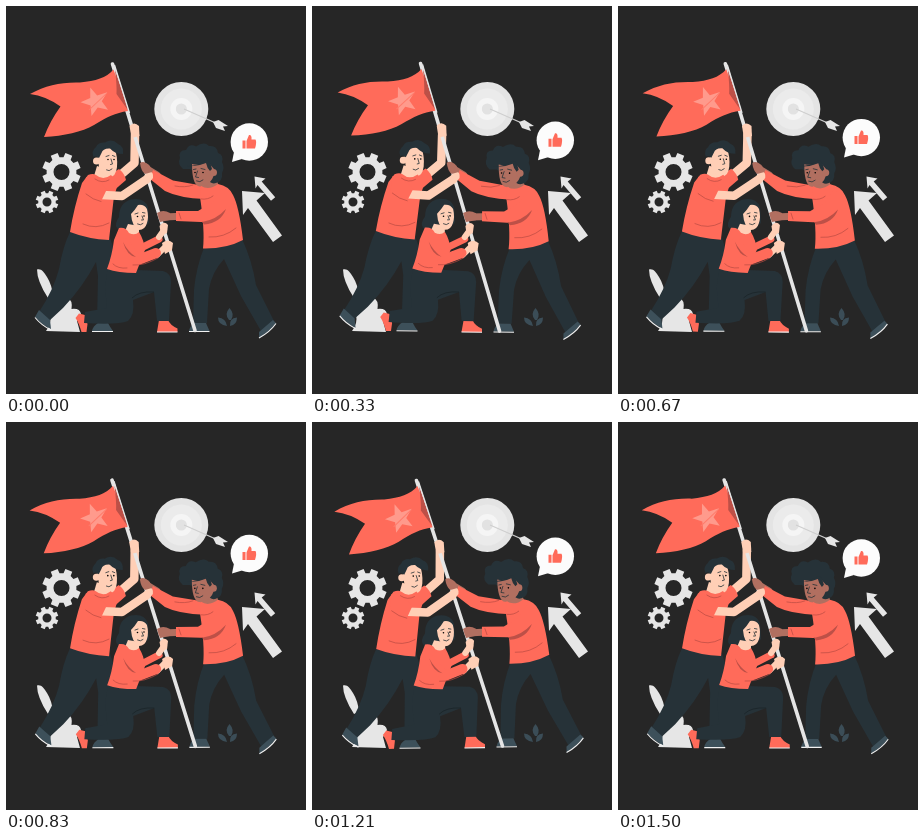
Animation of 300x388 px, one loop 1540 ms. Source, as an HTML page:

```html
<!DOCTYPE html>
<html lang="en">
<head>
<meta charset="utf-8">
<title>Raising the flag</title>
<style>
  html, body { margin: 0; width: 100%; height: 100%; overflow: hidden; background: #262626; }
  svg { display: block; width: 100vw; height: 100vh; }
  .coral { fill: #ff6b5a; }
  .pale { fill: #ffcfb6; }
  .brown { fill: #b16f60; }
  .navy, .hair { fill: #263238; }
  .light { fill: #e6e6e6; }
  .white { fill: #fcfcfc; }
  .shoe { fill: #3d505a; }
  .leaf { fill: #3b4d57; }
  .limb { fill: none; stroke-linecap: round; stroke-linejoin: round; }
  .limb.coral { stroke: #ff6b5a; }
  .limb.pale { stroke: #ffcfb6; }
  .limb.brown { stroke: #b16f60; }
  .fold { fill: none; stroke: #b94b42; stroke-width: .7; stroke-linecap: round; }
  .sole { fill: none; stroke: #f2f2f2; stroke-width: 1.1; }
  .shade { fill: #bd5047; }
  .line { fill: none; stroke: #263238; stroke-width: .8; stroke-linecap: round; }
</style>
</head>
<body>
<svg viewBox="0 0 300 388" preserveAspectRatio="none">
  <!-- scenery -->
  <g class="light">
    <path id="bigGear" fill-rule="evenodd"/>
    <path id="smallGear" fill-rule="evenodd"/>
    <path d="M236 185 259 187 250.500 194.500 276 229.500 267 236 242 202 237 209Z"/>
    <path d="M248.500 170.500 259.500 172.500 255.700 175.500 269.200 191.300 265 194.700 251.500 179 249.500 182.500Z"/>
    <path d="M31 263.500C35 262 38 266 41 271Q46 279 47 290L42 292Q31 275 31 263.500Z"/>
    <path d="M40 325Q46 317 44 309Q46 302 52 300Q54 291 61 291.500Q67 294 65.500 303Q74 302 75 308Q74 312 71 315L74 326Z"/>
  </g>
  <circle cx="175.300" cy="103" r="27" fill="#e4e4e4"/>
  <circle cx="175.300" cy="103" r="20.500" fill="#ebebeb"/>
  <circle cx="175.300" cy="103" r="11" fill="#f5f5f5"/>
  <circle cx="175.300" cy="103" r="5.500" fill="#e2e2e2"/>
  <path d="M178 103 212 118" stroke="#cfcfcf" stroke-width="1.200"/>
  <path d="M207 116 212.500 114 222 120 217 120.500 219 125 210 122Z" class="light"/>
  <path class="leaf" d="M223 314Q218 308 223.500 302Q229 308 225 314ZM221 320Q212 319 212 311.500Q220 312 221 320ZM224 320Q223 312 231 311.500Q231 319 224 320Z"/>

  <g id="bubble">
    <circle class="white" cx="243.300" cy="136" r="18.700"/>
    <path class="white" d="M226 156 228 146 236 153Z"/>
    <path class="coral" d="M236.500 134.500h3v8h-3zM240.500 135 243 129Q246 128.500 245.500 133.500H249.500Q251 136 249 142.500H240.500Z"/>
  </g>

  <g id="team">
    <!-- left man, legs -->
    <path class="navy" d="M64 226 104 232Q111 250 111 270L105 317H91L92 270 90 256Q77 281 57 302L43 315 33 306Q48 283 53 263Q57 240 64 226Z"/>
    <path class="shoe" d="M33 304 44 314 45 323Q36 319 29 311Z"/>
    <path class="sole" d="M29 311.500Q35 319 45 324"/>
    <path class="shoe" d="M92 317H102Q104 321 107 325H86Q87 320 92 317Z"/>
    <path class="sole" d="M86 325.500h21"/>

    <!-- right man, legs -->
    <path class="navy" d="M199 239 236 233Q246 254 250 279L268 315 255 325 235 290 218 253Q206 266 203 283L201 317H187L188 284Q190 261 199 239Z"/>
    <path class="shoe" d="M267 314 270 317Q264 325 253 332L253 326 260 320Z"/>
    <path class="sole" d="M270 317.500Q264 326 253 332"/>
    <path class="shoe" d="M188 317H200L203.500 325H183Q184 320 188 317Z"/>
    <path class="sole" d="M183 325.500h20.500"/>

    <!-- left man, raised arm -->
    <path class="limb pale" stroke-width="8.500" d="M111 172 128.500 157 129 129"/>
    <path class="coral" d="M99 172 113 163Q119 168 120 174L105 187Z"/>

    <!-- right man, far arm -->
    <path class="limb brown" stroke-width="7" d="M151 169 141 163"/>
    <path class="coral" d="M147 164 167 174.500 190 178.500 205 179 199 193Q173 192 159 185L144 173Z"/>

    <!-- pole and flag -->
    <path d="M106.500 58 189 324.500" stroke="#e5e5e5" stroke-width="3.600" stroke-linecap="round"/>
    <path class="coral" d="M107.500 63.500C100 72 90 75 74 76.500C55 76 40 79 24 88Q40 90 54.500 100.500Q44 115 38 131C58 130 76 126 88 119C101 111 109 107 122 105Z"/>
    <path class="shade" d="M109 63.500Q111 80 110.500 88L122.500 105Z"/>
    <path d="M108.500 59 123.500 107" stroke="#e5e5e5" stroke-width="1.300"/>
    <path id="star" fill="#ff9a8c"/>
    <path d="M83 104 101 87" stroke="#ff7b6b"/>

    <!-- left man -->
    <path class="pale" d="M91 160 104 164 105 171Q96 176 88 170Z"/>
    <path class="pale" d="M91 144Q98 138 108 140Q112 151 111 161Q110 171 103 171Q96 170 93 161Z"/>
    <circle class="pale" cx="90.500" cy="155" r="3.500"/>
    <path class="hair" d="M87.500 151Q85 145 90 141Q92 136 99 136.500Q106 132 112 138Q118 140 117 148Q109 148 104 142.500Q97 142 95.500 147L93 152Q90 149 87.500 151Z"/>
    <path class="line" d="M100 150.500 103 149.500M106.500 149.500 109 150.500M105 153 106.500 158 104.500 158.500M100.500 164Q103 166 106 163"/>
    <circle cx="102" cy="153.500" r=".8"/><circle cx="108" cy="153.500" r=".8"/>
    <path class="coral" d="M82 169Q87 167 90 169Q97 175 105 169L112 177Q110 185 108 190L103 234Q82 233 64 226Q68 201 76 177Z"/>
    <path class="limb pale" stroke-width="8.500" d="M96 189 116 190 141 173"/>
    <path class="coral" d="M80 171Q88 171 101 183L95 195.500Q86 193 78 187Z"/>
    <path class="fold" d="M80 188Q87 194 95 195.500M77 218Q90 224 103 217M89 173Q96 178 103 174"/>

    <!-- woman -->
    <path class="coral" d="M73 307.500 79 309 81.500 318 80.500 326H75.500Q73 317 69.500 312Z"/>
    <path class="coral" d="M153 314H162Q164 319 171.500 322.500V326H151Z"/>
    <path class="sole" d="M151 326h20.500"/>
    <path class="navy" d="M102 261 129 264 157 265Q165 267 165 276L163 315H151L148 286 127 294Q129 309 122 315Q112 319 78 317L79 306 101 302 99 281Z"/>
    <path d="M126 292Q133 285 148 286" fill="none" stroke="#1b2529" stroke-width=".8"/>
    <path class="hair" d="M111 222Q108 218 113 211Q113 197 125 193.500Q138 191 142 201L143 217Q135 225 124 224Q117 227 111 222Z"/>
    <path class="pale" d="M122 218 133 220 133 228Q126 232 119 225Z"/>
    <path class="pale" d="M125 208Q129 204 132 199Q138 198 141 203Q143 211 141 217Q139 224 133 224Q126 221 125 208Z"/>
    <path class="line" d="M129 208 132 207M136.500 206.500 139 207M136 210 137.500 214 135.500 214M131.500 218Q134.500 220 137 217.500"/>
    <circle cx="131.500" cy="210.500" r=".8"/><circle cx="138" cy="210" r=".8"/>
    <path class="limb coral" stroke-width="7" d="M137 241 153 233"/>
    <path class="coral" d="M113 222Q120 221 123 227Q129 230 133 226Q138 234 139 244L130 267Q112 267 101 263Q106 250 108 234Z"/>
    <path class="limb pale" stroke-width="6" d="M153 231 158 224M151 249 161 239"/>
    <path class="limb coral" stroke-width="10" d="M118 237 132 254 150 247"/>
    <path class="shade" d="M117 236Q122 246 130 251Q121 250 117 236Z"/>
    <path class="fold" d="M127 259Q138 260 152 252M107 258Q112 263 121 262"/>

    <!-- right man -->
    <path class="brown" d="M194 174 209 168 213 181Q206 187 197 183Z"/>
    <path class="hair" d="M177 163Q171 158 174 152Q172 144 180 144Q183 137 190 140.500Q198 135 203 140Q211 139 212 147Q218 149 216 156Q219 162 216 167Q217 175 210 177Q205 179 200 172L184 163Z"/>
    <path class="brown" d="M186 158Q195 160 201 155L208 163Q209 171 204 176Q198 182 192 180Q186 177 186 158Z"/>
    <circle class="brown" cx="207.500" cy="166.500" r="3.500"/>
    <path class="hair" d="M181 160Q191 160 200 154Q204 154 206 163L204 165Q201 162 200 157Q191 161 181 160Z"/>
    <path class="line" d="M187.500 163.500 190 163M195 162.500 199 163.500M191.500 165 189.500 171 192.500 171.500M190.500 175Q194 177 197 174"/>
    <circle cx="189" cy="166.500" r=".8"/><circle cx="197" cy="166.500" r=".8"/>
    <path class="coral" d="M195 180Q203 185 212 178Q223 180 227 189Q233 200 237 234Q220 243 197 242.500Q199 224 194 191Z"/>
    <path class="limb brown" stroke-width="7" d="M170 210.500 156 211"/>
    <path class="coral" d="M215 184Q228 187 228 202Q214 216 195 216L170 215 170 205 192 205 207 196Z"/>
    <path class="shade" d="M196 216Q210 214 220 203Q215 217 198 218.500Z"/>
    <path class="fold" d="M203 231Q218 232 230 222M169 180Q179 182 187 179M173 207 175 213M195 193Q202 194 207 190"/>

    <!-- hands -->
    <path class="pale" d="M123.500 120Q128 115 133 120L133.500 130 125.500 132Z"/>
    <path class="pale" d="M138 170 143 165Q148 166 147 172L142 178Z"/>
    <path class="brown" d="M134 157Q138 154 144 160L146 166 139 168Q135 165 134 157Z"/>
    <path class="brown" d="M151 207Q157 203 164 207L164 214 154 216Z"/>
    <path class="pale" d="M153.500 220Q158 214 162 219L161 227 155 229Z"/>
    <path class="pale" d="M156 237Q162 232 167 237L166 244 159 248Z"/>
  </g>
</svg>
<script>
  const byId = id => document.getElementById(id);
  const LOOP = 1540;

  const polar = (cx, cy, r, a) => `${cx + r * Math.cos(a)} ${cy + r * Math.sin(a)}`;

  function gear(cx, cy, outer, inner, hole) {
    const step = Math.PI / 4, points = [];
    for (let i = 0; i < 8; i++) {
      const a = (i + 0.5) * step;
      points.push(polar(cx, cy, inner, a - 0.26), polar(cx, cy, outer, a - 0.19),
                  polar(cx, cy, outer, a + 0.19), polar(cx, cy, inner, a + 0.26));
    }
    return `M${points.join('L')}ZM${cx - hole} ${cy}a${hole} ${hole} 0 1 0 ${2 * hole} 0a${hole} ${hole} 0 1 0 ${-2 * hole} 0Z`;
  }

  function star(cx, cy, outer, inner, turn) {
    const points = Array.from({ length: 10 }, (_, i) =>
      polar(cx, cy, i % 2 ? inner : outer, turn + i * Math.PI / 5));
    return `M${points.join('L')}Z`;
  }

  byId('bigGear').setAttribute('d', gear(55.5, 166, 19.5, 15, 8));
  byId('smallGear').setAttribute('d', gear(41, 196, 11.5, 8.8, 4.5));
  byId('star').setAttribute('d', star(89.5, 95.5, 15, 6.3, -1.93));

  function draw() {
    const phase = performance.now() % LOOP / LOOP * 2 * Math.PI;
    byId('team').setAttribute('transform', `rotate(${0.78 * Math.sin(phase)} 147 212)`);
    byId('bubble').setAttribute('transform', `translate(0 ${2.3 * (Math.cos(phase) - 1)})`);
    requestAnimationFrame(draw);
  }
  draw();
</script>
</body>
</html>
```
